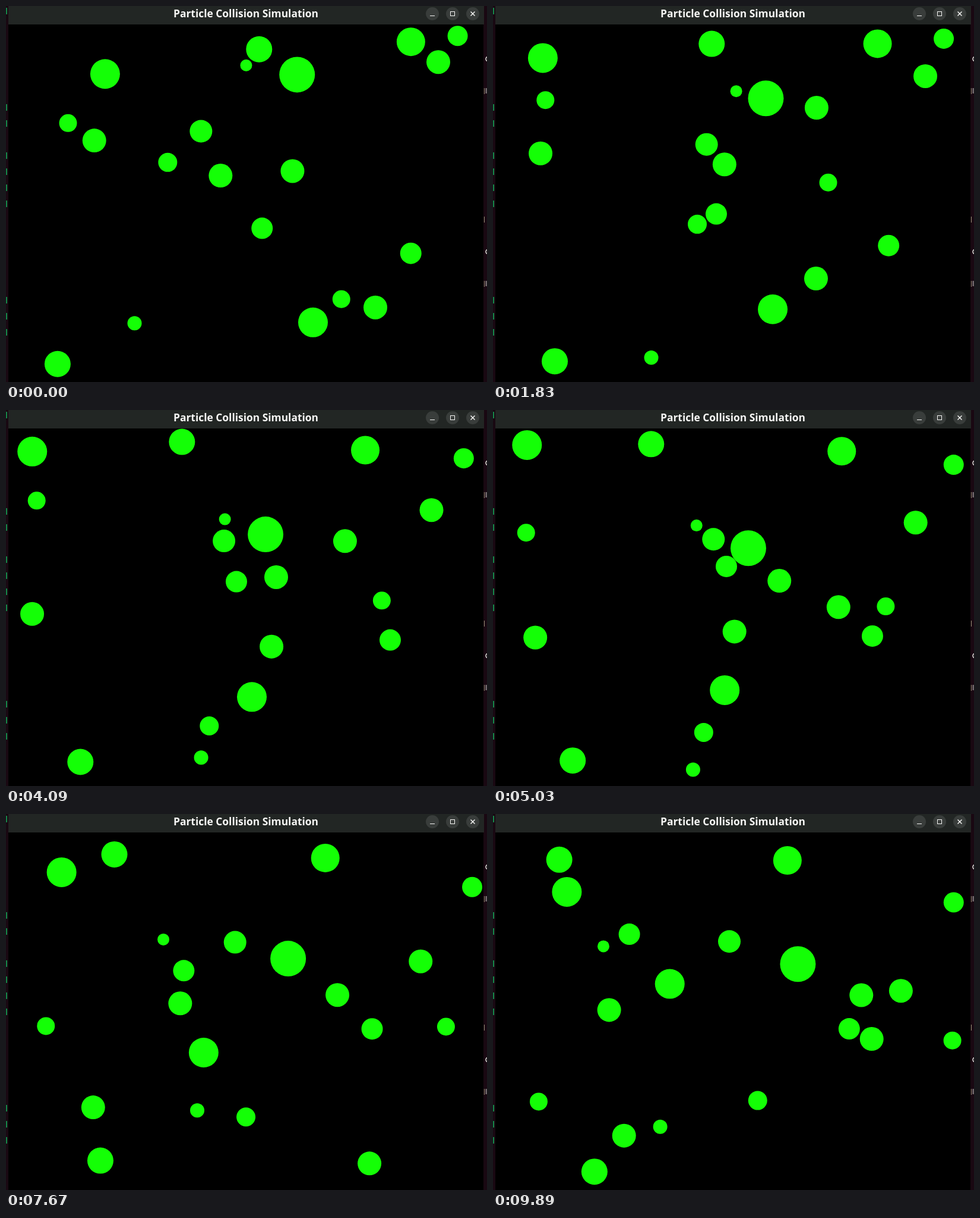
An HTML page with a canvas for the animation above (9920 ms loop, 810x632 px).

```html
<!DOCTYPE html>
<html lang="en">
<head>
<meta charset="utf-8">
<title>Particle Collision Simulation</title>
<style>
  html, body { margin: 0; width: 100%; height: 100%; overflow: hidden; background: #000; }
  canvas { display: block; }
</style>
</head>
<body>
<canvas id="stage" width="810" height="632"></canvas>
<script>
const ctx = document.getElementById('stage').getContext('2d');
const LOOP = 9920, STEP = 33.77, FRAMES = 294, SUBSTEPS = 24;
const WALLS = { left: 4, top: 31, right: 804, bottom: 631 };
const WALL_BOUNCE = .8;

// The state at one moment; elastic motion carries it both forward and backward.
const MOMENT = 139;
const particle = (r, x, y, vx, vy) => ({ r, x, y, vx, vy });
const cast = [
  particle(25, 52.6, 58.6, 13.8, -18.5),
  particle(10, 352.7, 191.9, -29.5, 6.4),
  particle(22, 277, 56, -31.8, 4),
  particle(30, 432.5, 224, -7.5, 24.5),
  particle(24, 593.6, 68.6, -18.8, 1.8),
  particle(17, 774, 88.2, 5.2, 11.6),
  particle(20, 713.4, 181.7, -5.1, 22.2),
  particle(15, 54.3, 187, 4.35, 57),
  particle(20, 61.5, 368.3, 28.7, 42),
  particle(19, 369.4, 217.4, 5.5, -.6),
  particle(16, 348.5, 546.1, 18.7, -12.4),
  particle(20, 472.5, 284.9, 28.8, 6.5),
  particle(20, 577.9, 291.7, 11.5, 117.4),
  particle(18, 391.2, 272.1, 5.3, -27),
  particle(18, 641.8, 382.3, -8.5, -7.1),
  particle(25, 398.7, 475, -25.2, -12.1),
  particle(15, 651.2, 326.6, 30.2, 10.4),
  particle(20, 421.1, 381.4, -42.8, -26.7),
  particle(22, 131, 590, 9.4, -2.5),
  particle(12, 336.4, 607.6, 1.5, 88),
];

function hitWalls(p, bounce) {
  if ((p.x < WALLS.left + p.r && p.vx < 0) || (p.x > WALLS.right - p.r && p.vx > 0)) p.vx *= -bounce;
  if ((p.y < WALLS.top + p.r && p.vy < 0) || (p.y > WALLS.bottom - p.r && p.vy > 0)) p.vy *= -bounce;
}

// Elastic collision, with mass in proportion to the radius.
function collide(a, b) {
  const dx = b.x - a.x, dy = b.y - a.y, distance = Math.hypot(dx, dy);
  if (distance > a.r + b.r) return;
  const nx = dx / distance, ny = dy / distance;
  const closing = (a.vx - b.vx) * nx + (a.vy - b.vy) * ny;
  if (closing <= 0) return;
  const impulse = 2 * closing / (1 / a.r + 1 / b.r);
  a.vx -= impulse / a.r * nx;
  a.vy -= impulse / a.r * ny;
  b.vx += impulse / b.r * nx;
  b.vy += impulse / b.r * ny;
}

function advance(balls, seconds, bounce) {
  for (const p of balls) {
    p.x += p.vx * seconds;
    p.y += p.vy * seconds;
    hitWalls(p, bounce);
  }
  balls.forEach((a, i) => balls.slice(i + 1).forEach(b => collide(a, b)));
}

function simulate() {
  const frames = [];
  for (const direction of [1, -1]) {
    const balls = cast.map(p => ({ ...p, vx: p.vx * direction, vy: p.vy * direction }));
    const bounce = WALL_BOUNCE ** direction;
    for (let f = MOMENT; f >= 0 && f < FRAMES; f += direction) {
      frames[f] = balls.map(({ r, x, y }) => ({ r, x, y }));
      for (let s = 0; s < SUBSTEPS; s++) advance(balls, STEP / 1000 / SUBSTEPS, bounce);
    }
  }
  return frames;
}

function rect(color, x, y, w, h) {
  ctx.fillStyle = color;
  ctx.fillRect(x, y, w, h);
}

function disc(color, x, y, radius) {
  ctx.fillStyle = color;
  ctx.beginPath();
  ctx.arc(x, y, radius, 0, Math.PI * 2);
  ctx.fill();
}

function line(x1, y1, x2, y2) {
  ctx.beginPath();
  ctx.moveTo(x1, y1);
  ctx.lineTo(x2, y2);
  ctx.stroke();
}

// Slivers of the terminal behind the window; its text sits on a fixed line grid.
function drawBackdrop() {
  rect('#190812', 0, 0, 810, 632);
  const textRow = n => 3 + n * 27;
  for (const n of [0, 6, 7, 9, 10, 11, 12, 18, 19, 20]) rect('#168447', 0, textRow(n), 2, 11);
  for (const n of [5, 13, 17]) rect('#9a9078', 805, textRow(n), 1, 10);
  for (const n of [5, 17]) rect('#d8d8d4', 808, textRow(n), 1, 9);
  ctx.strokeStyle = '#d8d8d4';
  ctx.lineWidth = 1.5;
  for (const n of [3, 15]) {
    ctx.beginPath();
    ctx.arc(812, textRow(n) + 5, 4, Math.PI * .6, Math.PI * 1.4);
    ctx.stroke();
  }
}

function drawTitleBar() {
  rect('#222624', 4, 0, 801, 31);
  ctx.font = '700 17.4px "Open Sans", "Noto Sans", sans-serif';
  ctx.textAlign = 'center';
  ctx.fillStyle = '#f7f7f5';
  ctx.fillText('Particle Collision Simulation', 404, 19);

  for (const x of [718, 752, 786]) disc('#393d3b', x, 13, 11);
  ctx.strokeStyle = '#f7f7f5';
  ctx.lineWidth = 1;
  line(714, 16.5, 722, 16.5);
  ctx.strokeRect(748.5, 9.5, 7, 7);
  ctx.lineWidth = 1.4;
  line(782.5, 9.5, 789.5, 16.5);
  line(789.5, 9.5, 782.5, 16.5);
}

const frames = simulate();

function draw(elapsed) {
  const index = Math.min(FRAMES - 1, Math.floor((elapsed % LOOP + 5) / STEP));
  drawBackdrop();
  rect('#000', 4, 31, 800, 601);
  for (const { r, x, y } of frames[index]) disc('#14ff06', x, y, r);
  drawTitleBar();
}

let start;
function tick(now) {
  start ??= now;
  draw(now - start);
  requestAnimationFrame(tick);
}
draw(0);
requestAnimationFrame(tick);
</script>
</body>
</html>
```
